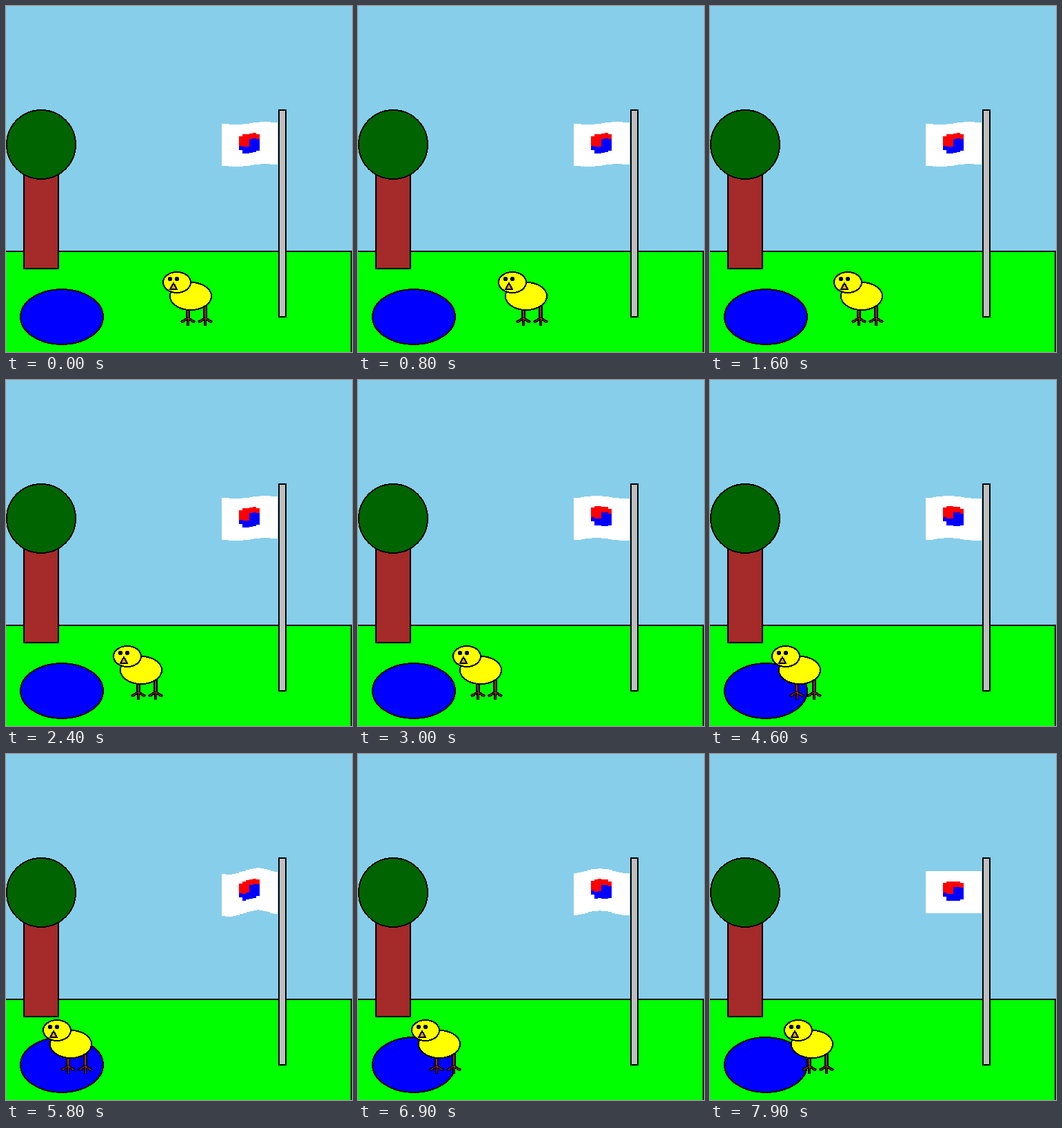
An HTML page that plays this animation: 502x502 px, repeating every 8 s.

```html
<!DOCTYPE html>
<html lang="en">
<head>
<meta charset="utf-8">
<title>Chick by the pond</title>
<style>
  html, body { margin: 0; width: 100%; height: 100%; overflow: hidden; background: #87ceeb; }
  svg { display: block; width: 502px; height: 502px; }
  .line { stroke: #000; stroke-width: 2; }
</style>
</head>
<body>
<svg viewBox="0 0 502 502" shape-rendering="crispEdges">
  <defs>
    <g id="leg">
      <rect x="-2" y="-26" width="4" height="40" fill="#a52a2a" class="line"/>
      <g fill="none">
        <path id="toes" d="M-10 19L0 13L10 19M0 13V24" stroke="#000" stroke-width="4"/>
        <path d="M-9 18.5L0 13L9 18.5M0 8V23" stroke="#a52a2a" stroke-width="1"/>
      </g>
    </g>
  </defs>
  <rect width="502" height="502" fill="#87ceeb"/>
  <g class="line">
    <rect x="-10" y="356" width="511" height="160" fill="#0f0"/>
    <rect x="26" y="231" width="50" height="150" fill="#a52a2a"/>
    <circle cx="51" cy="201" r="50" fill="#006400"/>
    <ellipse cx="81" cy="451" rx="60" ry="40" fill="#00f"/>
    <rect x="396" y="151" width="10" height="300" fill="#bebebe"/>
  </g>
  <g id="flag"></g>
  <g id="chick">
    <use href="#leg" x="264" y="440"/>
    <use href="#leg" x="289" y="440"/>
    <g class="line">
      <ellipse cx="268" cy="421" rx="30" ry="20" fill="#ff0"/>
      <ellipse cx="248" cy="401" rx="20" ry="15" fill="#ff0"/>
      <path d="M243 402L238 411H248Z" fill="#ffa500"/>
    </g>
    <circle cx="238" cy="396" r="3"/>
    <circle cx="248" cy="396" r="3"/>
  </g>
</svg>
<script>
  const STEP = 100, STEPS = 80, TURN = 59;
  const COLS = 16, COL_W = 5, FLAG_X = 313, FLAG_Y = 170;
  const WAVE_STEPS = 8, WAVE_COLS = 17, WAVE_HEIGHT = 5;

  // Emblem columns: top of red, top of blue, bottom of blue
  const EMBLEM_COL = 5;
  const EMBLEM = [
    [187, 201, 207], [185, 203, 213], [185, 203, 213],
    [185, 193, 213], [185, 193, 213], [187, 194, 211]
  ];

  const flag = document.getElementById('flag');
  const chick = document.getElementById('chick');

  function make(name, parent, attrs = {}) {
    const el = document.createElementNS('http://www.w3.org/2000/svg', name);
    for (const key in attrs) el.setAttribute(key, attrs[key]);
    return parent.appendChild(el);
  }

  function bar(parent, col, top, bottom, fill) {
    make('rect', parent, {
      x: FLAG_X + col * COL_W, y: top, width: COL_W + 1, height: bottom - top, fill
    });
  }

  const columns = Array.from({ length: COLS }, (_, i) => {
    const g = make('g', flag);
    bar(g, i, FLAG_Y, FLAG_Y + 61, '#fff');
    const part = EMBLEM[i - EMBLEM_COL];
    if (part) {
      bar(g, i, part[0], part[1], '#f00');
      bar(g, i, part[1], part[2], '#00f');
    }
    return g;
  });

  function draw(step) {
    const back = Math.max(0, step - TURN - 1);
    const dx = 3 * (back - Math.min(step, TURN));
    chick.setAttribute('transform', `translate(${dx})`);

    // The crest drifts one column left per step while the wave swells and fades
    const phase = step % WAVE_STEPS;
    const height = WAVE_HEIGHT * Math.sin(Math.PI * (phase + 1) / WAVE_STEPS);
    const crest = 12 - phase;
    columns.forEach((g, i) => {
      const dy = Math.round(-height * Math.cos(2 * Math.PI * (i - crest) / WAVE_COLS));
      g.setAttribute('transform', `translate(0 ${dy})`);
    });
  }

  const start = performance.now();
  function tick() {
    const time = performance.now() - start;
    draw(Math.floor(time / STEP) % STEPS);
    requestAnimationFrame(tick);
  }
  tick();
</script>
</body>
</html>
```
